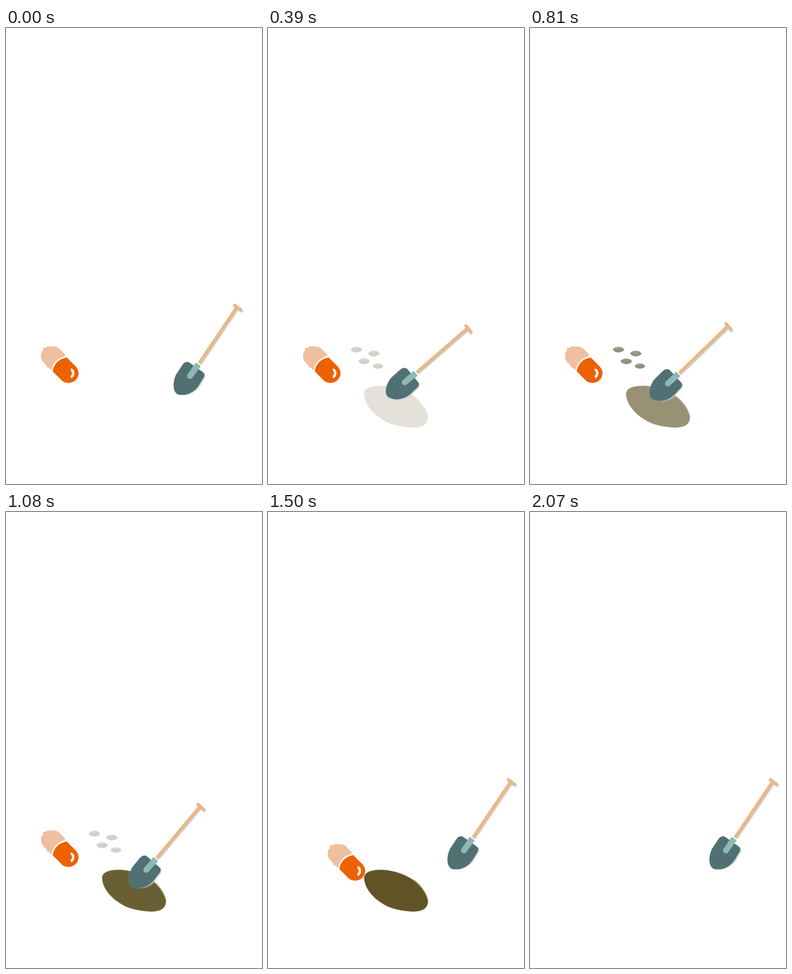
Write an HTML page that moves like this. It is 561 px wide and 998 px high and loops after 2370 ms.

```html
<!DOCTYPE html>
<html lang="en">
<head>
<meta charset="utf-8">
<title>Burying a capsule</title>
<style>
  html, body { margin: 0; width: 100%; height: 100%; overflow: hidden; background: #fff; }
  svg { display: block; width: 100%; height: 100%; }
</style>
</head>
<body>
<svg viewBox="0 0 561 998">
  <defs>
    <clipPath id="rim"><use href="#pit"/></clipPath>
    <filter id="soft"><feGaussianBlur stdDeviation="1"/></filter>
    <filter id="blur"><feGaussianBlur stdDeviation="2"/></filter>
    <path id="blade" d="M399 731C392 730 388 735 385 740L373 758C367 770 366 784 369 793C372 800 376 803 383 803L391 803C405 801 416 792 422 783L434 763C436 758 434 755 431 753L403 733Z"/>
    <path id="wood" d="M501 607L514 617M504 614L425 731" fill="none" stroke-width="7"/>
    <g id="pebble">
      <path d="M-12.5 0C-9 -8 8 -8 12.5 0C8 8 -8 8 -12.5 0Z" fill="#7a7464" stroke="#a9a67f" stroke-width=".8"/>
      <ellipse cx="-2" cy="-3" rx="5" ry="1.2" fill="#99957f"/>
    </g>
  </defs>

  <g id="hole">
    <path id="pit" d="M211 805C208 790 222 783 250 783C280 785 300 794 322 807C338 820 350 838 350.500 852C350 867 340 874 318 874.500C290 873 266 868 248 855C230 844 213 824 211 805Z" fill="#605326"/>
    <g clip-path="url(#rim)">
      <path d="M245 784C285 786 325 805 350 845" fill="none" stroke="#55471f" stroke-width="12" filter="url(#blur)"/>
      <g fill="#716b2c" filter="url(#soft)">
        <ellipse cx="260" cy="811" rx="22" ry="6"/>
        <ellipse cx="306" cy="811" rx="15" ry="8" transform="rotate(15 306 811)"/>
      </g>
    </g>
    <use href="#pit" style="fill:none" stroke="#a3b070" stroke-width=".8"/>
    <path d="M290 790C315 800 338 818 349 845" fill="none" stroke="#a8b873" stroke-width="1"/>
  </g>

  <g id="pebbles">
    <use href="#pebble" x="194" y="704"/>
    <use href="#pebble" x="232" y="712.500"/>
    <use href="#pebble" x="211" y="729.500"/>
    <use href="#pebble" transform="translate(241 740) scale(.93)"/>
  </g>

  <g id="pill">
    <path d="M98 749L95 744L90 743L89 739L79 728C76 720 76 711 79 708L81 707V700L87 700L90 697L104 697C110 697 114 699 117 702L129 714V718C115 722 104 731 100 747Z" fill="#f0bf9f"/>
    <path d="M103 747C107 734 116 724 133 721L152 740C161 749 161 760 154 769C146 778 133 779 124 773L105 754C103 752 102 750 103 747Z" fill="#ec6200"/>
    <path d="M142 748C149 748 149 762 142 764" fill="none" stroke="#f1f0ee" stroke-width="5.500"/>
  </g>

  <g id="shovel" stroke-linecap="round">
    <g transform="translate(2 2)" fill="#c9c9c9" stroke="#c9c9c9" filter="url(#soft)">
      <use href="#wood"/>
      <path d="M434 757L434 763L422 783C416 792 405 799 391 801L420 745Z" stroke="none"/>
    </g>
    <use href="#wood" stroke="#e8b986"/>
    <use href="#blade" fill="#507073" stroke="#7d9698" stroke-width=".6"/>
    <path d="M421 735L403 763" stroke="#fff" stroke-width="12" stroke-linecap="butt" stroke-dasharray="5 99"/>
    <path d="M416 732L427 740L408 766C403 771 394 766 398 758Z" fill="#8fb8b5"/>
  </g>
</svg>
<script>
  const LOOP = 2370, STEP = 30;
  const part = id => document.getElementById(id);
  const [hole, pebbles, pill, shovel] = ['hole', 'pebbles', 'pill', 'shovel'].map(part);

  // Linear progress from 0 to 1 between two times
  const ramp = (t, from, to) => Math.min(1, Math.max(0, (t - from) / (to - from)));

  // Two even back-and-forth swings while digging
  function swing(t) {
    const phase = ramp(t, 240, 1140) * 2 % 1;
    return 22.5 * (1 - Math.abs(2 * phase - 1));
  }

  function draw(t) {
    const arrive = ramp(t, 0, 240), leave = ramp(t, 1140, 1350);
    const drop = ramp(t, 1350, 1800), fade = 1 - ramp(t, 1800, 2070);
    const x = -90 * arrive + 116 * leave, y = 26 * arrive - 47 * leave;
    shovel.setAttribute('transform', `translate(${x} ${y}) rotate(${swing(t)} 442 703)`);
    pill.setAttribute('transform', `translate(${162 * drop} ${90 * drop})`);
    pill.setAttribute('opacity', fade);
    hole.setAttribute('opacity', ramp(t, 240, 1140) * fade);
    pebbles.setAttribute('opacity', ramp(t, 240, 690) * (1 - ramp(t, 690, 1290)));
  }

  const start = performance.now();
  function tick() {
    const t = (performance.now() - start) % LOOP;
    draw(Math.floor(t / STEP) * STEP);
    requestAnimationFrame(tick);
  }
  tick();
</script>
</body>
</html>
```
